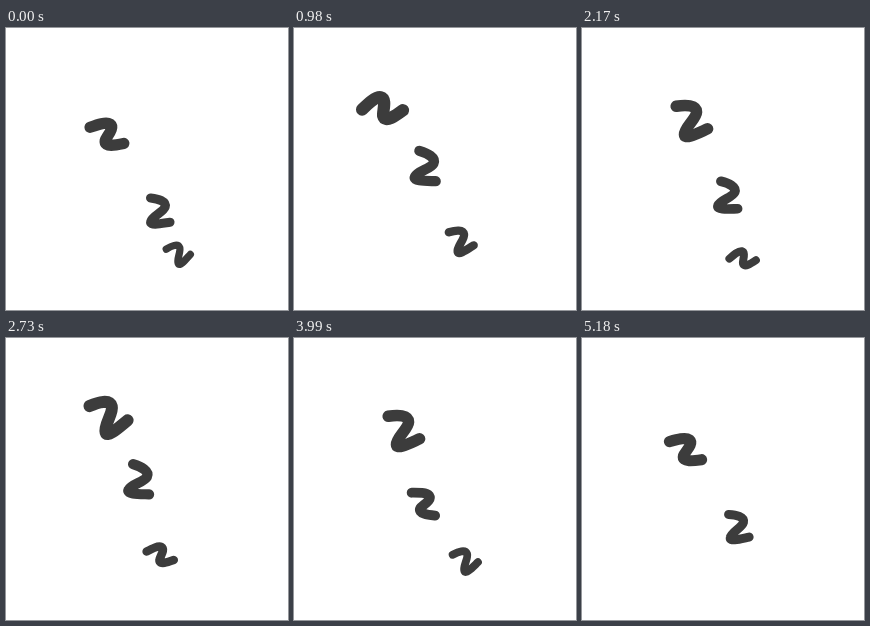
Write an HTML page with a canvas that moves like this. It is 282x282 px and loops after 5250 ms.

```html
<!DOCTYPE html>
<html>
<head>
<meta charset="utf-8">
<style>
  html, body { margin: 0; width: 100%; height: 100%; overflow: hidden; background: #fff; }
  canvas { display: block; }
</style>
</head>
<body>
<canvas id="stage" width="282" height="282"></canvas>
<script>
const ctx = document.getElementById('stage').getContext('2d');
const STEP = 70, STEPS = 75, CYCLE = 76, LIFE = 75;

const tall = {
  path: new Path2D('M-19-7.75C-9.5-11.75 1.5-14.25 3.5-6.75C5 .25-5.5 12.25-3.5 19.25C-2 25.25 10.5 14.25 19 7.75'),
  from: [172.3, 223.8], to: [98.5, 68.5], drift: 2, tilt: -10, swing: 50
};
const wide = {
  path: new Path2D('M-20 0C-14-6-7-13-2-12.5C5-11 0 2 1 6C3 13.5 14 5 20.5 0'),
  from: [163, 237], to: [86.5, 78.5], drift: 0.5, tilt: -3, swing: 48
};
const letters = [
  { kind: tall, born: 0 },
  { kind: wide, born: 22 },
  { kind: tall, born: 50 }
];

const ease = t => (1 - Math.cos(Math.PI * t)) / 2;
const mix = (a, b, t) => a + (b - a) * t;

function drawLetter({ kind, born }, step) {
  const age = (step - born + CYCLE) % CYCLE;
  if (age >= LIFE - 1) return;
  const t = age / LIFE, rise = ease(t);
  const drift = kind.drift * Math.sin(Math.PI * t);
  const scale = mix(0.6, 1.05, t);
  ctx.save();
  ctx.translate(mix(kind.from[0], kind.to[0], rise) + drift, mix(kind.from[1], kind.to[1], rise));
  // one swing out and back over the whole rise
  ctx.rotate((kind.tilt + kind.swing * ease(2 * t)) * Math.PI / 180);
  ctx.scale(scale, scale);
  ctx.stroke(kind.path);
  ctx.restore();
}

function draw(now) {
  const step = Math.floor(now / STEP) % STEPS;
  ctx.fillStyle = '#fff';
  ctx.fillRect(0, 0, 282, 282);
  ctx.strokeStyle = '#3c3c3c';
  ctx.lineWidth = 12.2;
  ctx.lineCap = ctx.lineJoin = 'round';
  letters.forEach(letter => drawLetter(letter, step));
}

const start = performance.now();
function loop() {
  draw(performance.now() - start);
  requestAnimationFrame(loop);
}
loop();
</script>
</body>
</html>
```
